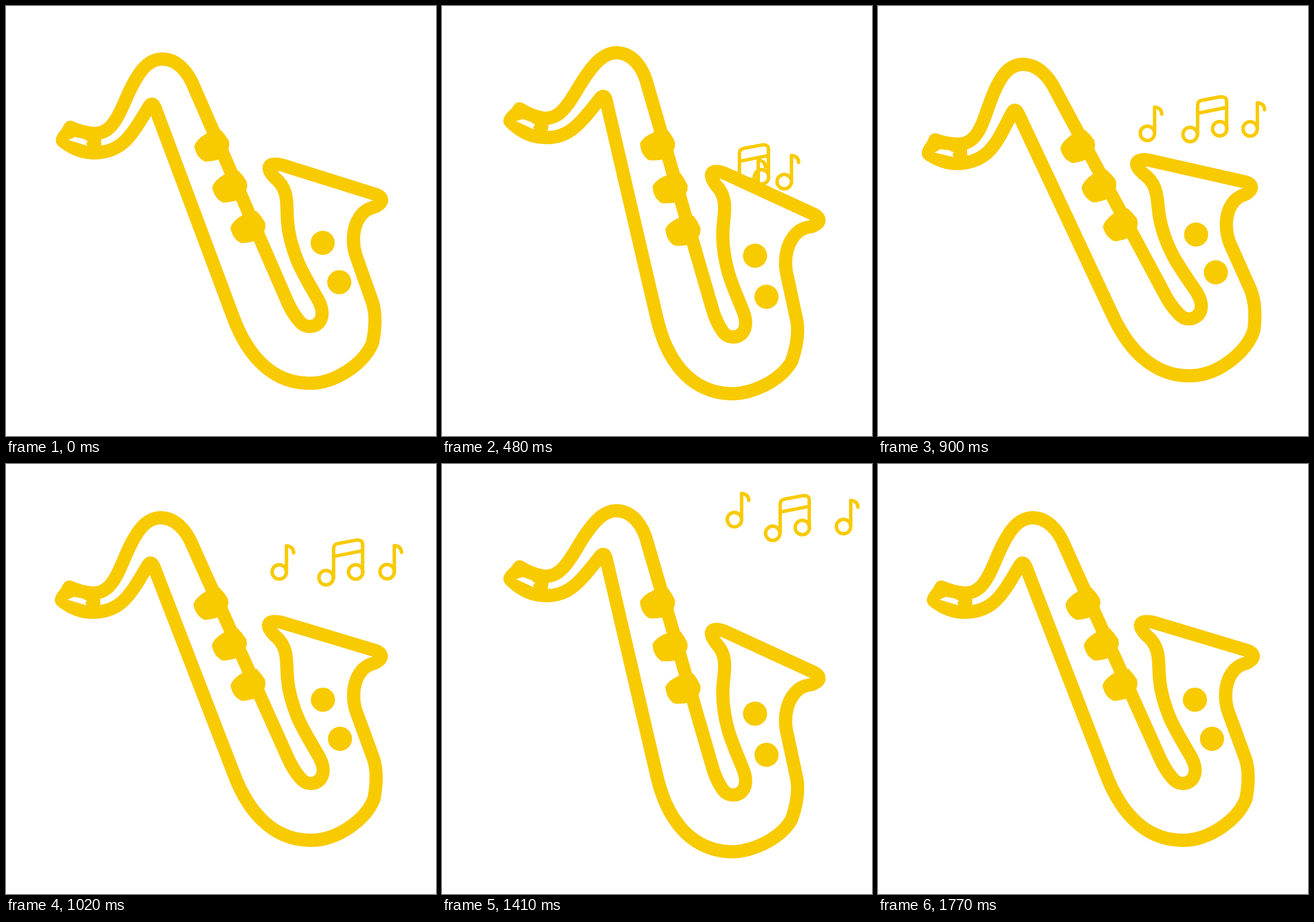
An HTML page for the animation above (1800 ms loop, 748 by 748 pixels).

```html
<!DOCTYPE html>
<html>
<head>
<meta charset="utf-8">
<style>
  html, body { margin: 0; width: 100%; height: 100%; overflow: hidden; background: #fff; }
  svg { display: block; width: 100vw; height: 100vh; --gold: #f8ca00; }
  .note { fill: none; stroke: var(--gold); stroke-width: 6; stroke-linecap: round; stroke-linejoin: round; }
  .body { fill: #fff; stroke: var(--gold); stroke-width: 23; stroke-linejoin: round; }
  .solid { fill: var(--gold); }
</style>
</head>
<body>
<svg viewBox="0 0 748 748">
  <defs>
    <g id="single">
      <circle cx="-12.5" cy="48.5" r="12.5"/>
      <path d="M0,48V3Q12,4 12.5,15"/>
    </g>
    <path id="key" d="M371,215Q380,224 386,234L387,242L384,254L368,267Q355,271 345,271C334,266 328,256 326,244Q330,232 347,222Z"/>
  </defs>
  <use class="note" href="#single"/>
  <g class="note">
    <circle cx="-63.5" cy="69" r="12.5"/>
    <circle cx="-12" cy="59" r="12.5"/>
    <path d="M-50.5,69V18Q-50.5,11 -43,9.5L-11,3.5Q0,2.5 0,11V59M-50.5,32L0,22"/>
  </g>
  <use class="note" href="#single"/>
  <g id="sax">
    <path class="body" d="M97,238C115,252 132,258 150,258C200,258 216,228 245,179Q251.5,166 257,178
      L396,538C424,613 470,654.5 530,654.5C575,655 625,620 640,583
      C645,557 646,533 639,512L609,430C602,408 602,376 622,356Q630,349 642,346Q653,340 653,334
      Q652,328 644,325L481,276Q458,270 456.5,281Q457,288 467,298C490,316 488,340 489,362
      C490,392 498,420 510,447C525,478 540,500 546,512C554,528 553,541 546,549
      C538,557 522,560 511,545Q500,532 492,515L360.5,222L325,143C313,113 293,93.5 269,93.5
      C243,93.5 228,118 216,142C204,166 195,196 180,212Q169,224 152,224.5Q130,223 110,214Z"/>
    <path class="solid" d="M90,247Q79,237 92,221L104,206Q110,203 118,207Q135,213 152,213L164,226V246L150,262Q110,262 90,247Z"/>
    <path fill="#fff" d="M107,236L118,231L134,234Q138,238 141,237L138,242L140,246Z"/>
    <g class="solid">
      <use href="#key"/>
      <use href="#key" x="32" y="71"/>
      <use href="#key" x="64.5" y="141"/>
      <circle cx="551.3" cy="410" r="21"/>
      <circle cx="581" cy="478" r="21"/>
    </g>
  </g>
</svg>
<script>
  const LOOP = 1800, STEP = 30, LEG = 450;
  const sax = document.getElementById('sax');
  const notes = document.querySelectorAll('.note');
  const swing = [0, 10, -5, 10, 0];
  const paths = [
    { x: [636, 561, 479.5, 504.5, 588], y: [321, 278, 181.5, 55, 21] },
    { x: [580, 562.5, 603, 655, 574], y: [323, 250, 161, 64.5, 0] },
    { x: [620, 600.5, 656, 714.5, 697], y: [347, 270, 172, 72, 13] }
  ];

  // Linear interpolation through five evenly spaced keys
  function at(keys, t) {
    const i = Math.floor(t / LEG);
    return keys[i] + (keys[i + 1] - keys[i]) * (t / LEG - i);
  }

  function draw() {
    const now = Math.floor(performance.now() / STEP) * STEP;
    const t = (now + STEP) % LOOP; // the loop opens one step into the swing
    sax.setAttribute('transform', `rotate(${at(swing, t)} 374 374)`);
    const shown = t >= 150 && t < 1650;
    notes.forEach((note, i) => {
      note.setAttribute('transform', `translate(${at(paths[i].x, t)} ${at(paths[i].y, t)})`);
      note.setAttribute('visibility', shown ? 'visible' : 'hidden');
    });
    requestAnimationFrame(draw);
  }
  draw();
</script>
</body>
</html>
```
